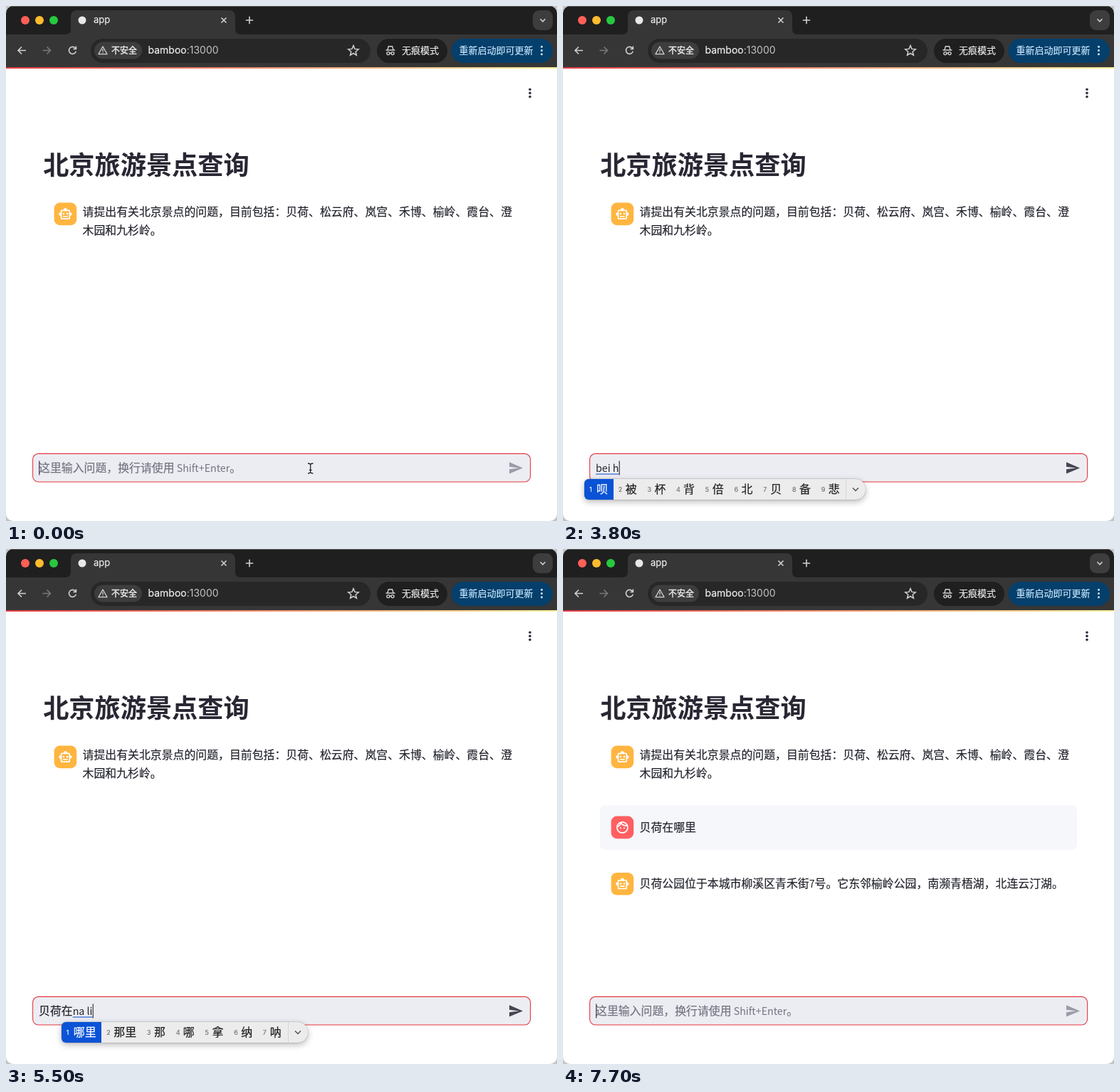
Animation, 774 px wide and 724 px high, one loop 8000 ms. Source, as an HTML page:

```html
<!DOCTYPE html>
<html lang="zh-CN">
<head>
<meta charset="utf-8">
<title>app</title>
<style>
  html, body { margin: 0; width: 100%; height: 100%; overflow: hidden; background: #c4c4c6; }
  #stage { position: absolute; left: 0; top: 0; width: 774px; height: 724px; overflow: hidden; border-radius: 10px; background: #fff; }
  svg { display: block; }
  text { font-family: "Noto Sans CJK SC", "Noto Sans CJK", sans-serif; font-size: 15.88px; fill: #23242d; stroke: #23242d; stroke-width: .2; }
  .latin { font-size: 14.24px; stroke: none; }
  .title { font-size: 36.2px; font-weight: 700; fill: #282733; stroke: none; }
  .hint { fill: #737481; stroke: #737481; }
  .ui { font-family: Inter, "Noto Sans CJK SC", sans-serif; font-size: 13px; fill: #ededed; stroke: #ededed; }
  .line { fill: none; stroke: #d0d0d0; stroke-width: 1.6; }
  #popup {
    position: absolute; top: 665px; height: 28.5px; display: flex;
    background: #ececed; border-radius: 6px 14px 14px 6px;
    box-shadow: 0 0 0 .5px rgba(0,0,0,.2), 0 3px 10px rgba(0,0,0,.28);
    font: 16px/27px "Noto Sans CJK SC", "Noto Sans CJK", sans-serif; color: #222;
    -webkit-text-stroke: .2px;
  }
  #popup span { display: flex; padding: 0 7.7px 0 7px; white-space: nowrap; }
  #popup i { font: 9px/29px Inter, sans-serif; width: 10px; color: #747474; }
  #popup span:first-child { background: #0a53d6; color: #fff; border-radius: 6px 0 0 6px; }
  #popup span:first-child i { color: #fff; }
  #popup svg { border-left: 1px solid #d6d6d8; margin-left: 1px; }
</style>
</head>
<body>
<div id="stage">
<svg width="774" height="724" viewBox="0 0 774 724">
  <defs>
    <linearGradient id="strip">
      <stop offset="0" stop-color="#e33b46"/>
      <stop offset="1" stop-color="#fbf09a"/>
    </linearGradient>
    <g id="bot">
      <rect width="31.6" height="31.6" rx="8" fill="#ffb53f"/>
      <path transform="translate(5.8 5.8) scale(.833)" fill="#fff" d="M20 9V7c0-1.1-.9-2-2-2h-3c0-1.66-1.34-3-3-3S9 3.34 9 5H6c-1.1 0-2 .9-2 2v2c-1.66 0-3 1.34-3 3s1.34 3 3 3v4c0 1.1.9 2 2 2h12c1.1 0 2-.9 2-2v-4c1.66 0 3-1.34 3-3s-1.34-3-3-3zm-2 10H6V7h12v12zm-9-6c-.83 0-1.5-.67-1.5-1.5S8.17 10 9 10s1.5.67 1.5 1.5S9.83 13 9 13zm7.5-1.5c0 .83-.67 1.5-1.5 1.5s-1.5-.67-1.5-1.5.67-1.5 1.5-1.5 1.5.67 1.5 1.5zM8 15h8v2H8v-2z"/>
    </g>
  </defs>

  <!-- browser bar -->
  <rect width="774" height="86" fill="#1f1f1f"/>
  <rect width="774" height="1" fill="#5a5a5a"/>
  <path d="M0 40H83Q91 40 91 32V15Q91 6 100 6H313Q322 6 322 15V32Q322 40 330 40H774V86H0Z" fill="#363636"/>
  <circle cx="27" cy="20" r="6" fill="#ff5f57"/>
  <circle cx="47" cy="20" r="6" fill="#febc2e"/>
  <circle cx="67" cy="20" r="6" fill="#28c840"/>
  <circle cx="107" cy="20" r="5.5" fill="#e8e8e8"/>
  <text class="ui" x="123" y="24.3">app</text>
  <path class="line" d="M302.5 16.5l7 7m0-7l-7 7M336.8 20h10.4M342 14.8v10.4"/>
  <rect x="740" y="6" width="28" height="28" rx="9" fill="#3d3d3d"/>
  <path class="line" d="M750.5 18.3l3.5 3.5 3.5-3.5"/>

  <path class="line" d="M28 62.5H17m5-5l-5 5 5 5"/>
  <path class="line" style="stroke:#787878" d="M51.5 62.5h11m-5-5l5 5-5 5"/>
  <path class="line" d="M97.6 59.5a5 5 0 1 0 .7 4.2M98.4 56.6v3.9h-3.9"/>
  <rect x="119" y="46" width="393" height="34" rx="17" fill="#272727"/>
  <rect x="124" y="50.5" width="67" height="24" rx="12" fill="#3d3d3d"/>
  <path class="line" stroke-linejoin="round" style="stroke-width:1.3" d="M136 57l6 10.6h-12zM136 60.5v3.4m0 1v1.3"/>
  <text class="ui" x="148" y="67" style="font-size:12px;stroke-width:.4">不安全</text>
  <text class="ui" x="199.5" y="67.4" style="font-size:14px">bamboo<tspan fill="#c4c4c4" stroke="none">:13000</tspan></text>
  <path class="line" style="stroke-width:1.5" d="M488 55.6l2 4.8 5.2.4-4 3.4 1.2 5-4.4-2.7-4.4 2.7 1.2-5-4-3.4 5.2-.4z"/>
  <rect x="521" y="46" width="99" height="34" rx="17" fill="#1f1f1f"/>
  <g class="line" style="stroke-width:1.4">
    <path d="M533.5 62h13M536 61.5l1.4-4.8h5.2l1.4 4.8M538.8 66.3q1.2-.8 2.4 0"/>
    <circle cx="536.9" cy="66.6" r="2"/><circle cx="543.1" cy="66.6" r="2"/>
  </g>
  <text class="ui" x="556" y="67.4">无痕模式</text>
  <rect x="625.5" y="46" width="142.5" height="34" rx="17" fill="#053f6b"/>
  <text class="ui" x="636.5" y="67.4" style="fill:#c6e7ff;stroke:#c6e7ff">重新启动即可更新</text>
  <g fill="#c6e7ff"><circle cx="752.5" cy="57.3" r="1.5"/><circle cx="752.5" cy="62.5" r="1.5"/><circle cx="752.5" cy="67.7" r="1.5"/></g>

  <!-- page -->
  <rect y="86" width="774" height="2" fill="url(#strip)"/>
  <g fill="#31333f"><circle cx="736" cy="117.2" r="1.8"/><circle cx="736" cy="122.4" r="1.8"/><circle cx="736" cy="127.6" r="1.8"/></g>
  <g id="status">
    <g fill="none" stroke="#5d5f6b" stroke-width="1.7" stroke-linecap="round">
      <circle cx="574" cy="114.5" r="1.6" fill="#5d5f6b"/>
      <path d="M572.5 118l-2.5 6M567 121l2-3h4l3 3"/>
      <path class="legs" d="M570 124l4 2-1 5M570 124l-2 4h-4"/>
      <path class="legs" d="M570 124l1 4-3 3M570 124l3 3 4-1"/>
    </g>
    <text class="hint" x="587" y="126.6" style="font-size:12.3px">RUNNING...</text>
    <text x="674.5" y="126.6" style="font-size:12.5px">Stop</text>
  </g>
  <text class="title" x="52.2" y="236.6">北京旅游景点查询</text>
  <use href="#bot" x="67.6" y="276.6"/>
  <text x="107.5" y="295">请提出有关北京景点的问题，目前包括：贝荷、松云府、岚宫、禾博、榆岭、霞台、澄</text>
  <text x="107.5" y="320.6">木园和九杉岭。</text>

  <g id="question">
    <rect x="52" y="360" width="670" height="63" rx="8" fill="#f6f7fb"/>
    <rect x="67.6" y="375.6" width="31.6" height="31.6" rx="8" fill="#ff5f61"/>
    <path transform="translate(73.4 381.4) scale(.833)" fill="#fff" d="M10.25 13c0 .69-.56 1.25-1.25 1.25S7.75 13.69 7.75 13s.56-1.25 1.25-1.25 1.25.56 1.25 1.25zM15 11.75c-.69 0-1.25.56-1.25 1.25s.56 1.25 1.25 1.25 1.25-.56 1.25-1.25-.56-1.25-1.25-1.25zm7 .25c0 5.52-4.48 10-10 10S2 17.52 2 12 6.48 2 12 2s10 4.48 10 10zM10.66 4.12C12.06 6.44 14.6 8 17.5 8c.46 0 .91-.05 1.34-.12C17.44 5.56 14.9 4 12 4c-.46 0-.91.05-1.34.12zM4.42 9.47c1.71-.97 3.03-2.55 3.66-4.44C6.37 6 5.05 7.58 4.42 9.47zM20 12c0-.78-.12-1.53-.33-2.24-.7.15-1.42.24-2.17.24-3.13 0-5.92-1.44-7.76-3.69C8.69 8.87 6.6 10.88 4 11.86c.01.04 0 .09 0 .14 0 4.42 3.58 8 8 8s8-3.58 8-8z"/>
    <text x="107.5" y="397">贝荷在哪里</text>
  </g>
  <g id="answer">
    <use href="#bot" x="67.6" y="455"/>
    <text id="reply" x="107.5" y="476.4"></text>
  </g>

  <!-- input -->
  <rect x="37.6" y="629.4" width="699" height="39.6" rx="8" fill="#ecedf3" stroke="#e5383f" stroke-width="1.1"/>
  <text id="hint" class="hint" x="46" y="655">这里输入问题，换行请使用<tspan class="latin"> Shift+Enter</tspan>。</text>
  <text id="typed" x="46" y="655"></text>
  <rect id="under" y="657.4" height="1.3" fill="#3b6fd0"/>
  <rect id="caret" y="639.5" width="1.1" height="20" fill="#262730"/>
  <path id="send" transform="translate(705.2 638.6) scale(.905)" d="M2 21L23 12 2 3v7l15 2-15 2z"/>
  <path id="beam" fill="none" stroke="#222" stroke-width="1.3" d="M424 643q3.7 0 3.7 2.2v9.6q0 2.2-3.7 2.2M431.4 643q-3.7 0-3.7 2.2v9.6q0 2.2 3.7 2.2M425.8 652.3h3.8"/>
</svg>
<div id="popup"></div>
</div>

<script>
const $ = id => document.getElementById(id);
const LOOP = 8000;
const REPLY = "贝荷公园位于本城市柳溪区青禾街7号。它东邻榆岭公园，南濒青梧湖，北连云汀湖。";

const BEI = [..."呗被杯背倍北贝备悲"];
const BEIHE = ["贝荷", ..."呗被杯背倍北"];
const ZAI = [..."在再载仔崽宰栽灾哉"];
const NA = [..."那哪拿纳呐娜钠捺呢"];
const NALI = ["哪里", "那里", ..."那哪拿纳呐"];

// time, committed text, text being composed, candidates
const STEPS = [
  [0, ""], [1400, "b"], [1600, "be"], [1700, "bei"], [2400, "be"], [2600, "b"], [2700, ""],
  [3200, "", "b"], [3400, "", "be"], [3500, "", "bei", BEI], [3800, "", "bei h", BEI],
  [3900, "", "bei he", BEI], [4000, "", "bei he", BEIHE], [4200, "贝荷"],
  [4400, "贝荷", "z"], [4500, "贝荷", "za"], [4600, "贝荷", "zai", ZAI], [4800, "贝荷在"],
  [5000, "贝荷在", "n"], [5200, "贝荷在", "na"], [5300, "贝荷在", "na l", NA],
  [5400, "贝荷在", "na li", NA], [5500, "贝荷在", "na li", NALI], [5700, "贝荷在哪里"], [6100, ""]
];

// time, caret opacity
const BLINK = [
  [0, 1], [100, .5], [200, 0], [700, 1], [1100, .5], [1200, 0], [1400, 1], [2100, .5], [2200, 0],
  [2600, 1], [3100, .5], [3200, 1], [6600, .5], [6700, 0], [7200, 1]
];

const at = (list, t) => list.findLast(row => row[0] <= t);
const show = (el, on) => { el.style.display = on ? "" : "none"; };
const runs = s => s.replace(/[ -~]+/g, m => `<tspan class="latin">${m}</tspan>`);

function measure(s) {
  $("typed").innerHTML = runs(s);
  return s ? $("typed").getComputedTextLength() : 0;
}

function drawPopup(list, x) {
  show($("popup"), list);
  if (!list) return;
  $("popup").style.left = x - 16 + "px";
  $("popup").innerHTML = list.map((c, i) => `<span><i>${i + 1}</i>${c}</span>`).join("") +
    '<svg width="27" height="28.5"><path d="M9 12.5l4 4 4-4" fill="none" stroke="#555" stroke-width="1.5"/></svg>';
}

function drawInput([, text, comp = "", list]) {
  const start = 46 + measure(text);
  const end = 46 + measure(text + comp);
  const empty = !(text + comp);
  show($("hint"), empty);
  $("send").setAttribute("fill", empty ? "#9a9ca9" : "#454650");
  $("caret").setAttribute("x", end + .2);
  $("under").setAttribute("x", start);
  $("under").setAttribute("width", end - start);
  drawPopup(list, start);
}

let last;
function frame() {
  const t = performance.now() % LOOP;
  const step = at(STEPS, t);
  if (step !== last) drawInput(last = step);
  $("caret").setAttribute("opacity", at(BLINK, t)[1]);
  show($("beam"), t < 1400);
  show($("question"), t >= 6200);
  show($("status"), t >= 6300 && t < 7700);
  const pose = Math.floor(t / 300) % 2;
  document.querySelectorAll(".legs").forEach((el, i) => show(el, i === pose));
  show($("answer"), t >= 6900);
  const part = Math.min(1, (Math.floor((t - 6900) / 100) + 1) / 8);
  $("reply").innerHTML = runs(REPLY.slice(0, Math.max(0, Math.ceil(REPLY.length * part))));
  requestAnimationFrame(frame);
}
frame();
</script>
</body>
</html>
```
